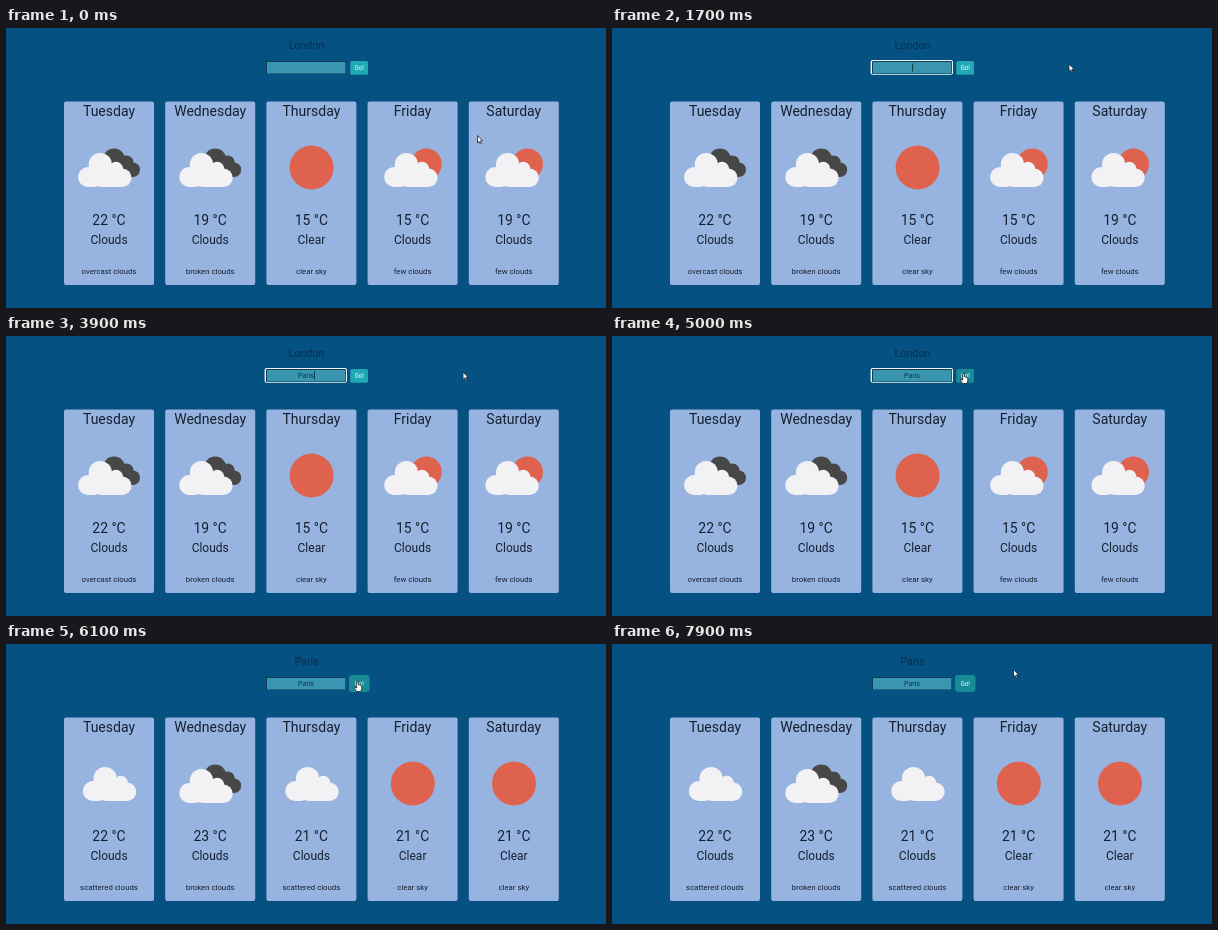
Recreate the animation shown at these times as an HTML page with a canvas. Size 600 px wide and 280 px high, loop 8 s.

```html
<!DOCTYPE html>
<html lang="en">
<head>
<meta charset="utf-8">
<title>Weather forecast</title>
<style>
  html, body { margin: 0; width: 600px; height: 280px; overflow: hidden; background: #045182; }
  canvas { display: block; }
</style>
</head>
<body>
<canvas id="stage" width="600" height="280"></canvas>
<script>
const ctx = document.getElementById('stage').getContext('2d');
const LOOP = 8000;
const FONT = 'Roboto, "Open Sans", sans-serif';
const INK = '#14202f', SUN = '#df624e', WHITE = '#f2f1f4', DARK = '#474748';

const days = ['Tuesday', 'Wednesday', 'Thursday', 'Friday', 'Saturday'];
const forecasts = {
  London: [
    [22, 'Clouds', 'overcast clouds', 'broken'],
    [19, 'Clouds', 'broken clouds', 'broken'],
    [15, 'Clear', 'clear sky', 'sun'],
    [15, 'Clouds', 'few clouds', 'few'],
    [19, 'Clouds', 'few clouds', 'few']
  ],
  Paris: [
    [22, 'Clouds', 'scattered clouds', 'cloud'],
    [23, 'Clouds', 'broken clouds', 'broken'],
    [21, 'Clouds', 'scattered clouds', 'cloud'],
    [21, 'Clear', 'clear sky', 'sun'],
    [21, 'Clear', 'clear sky', 'sun']
  ]
};

// Event times in ms
const FOCUS = 1000, BLUR = 5300, TITLE = 5500, CARDS = 6100;
const keyTimes = [1900, 2000, 2150, 2250, 2400];

// Pointer moves: start, end, from, to
const moves = [
  [100, 800, [471.5, 107.5], [322, 39]],
  [1100, 1600, [322, 39], [457, 36]],
  [4500, 4900, [457, 36], [351.5, 37.5]],
  [7200, 7700, [351.5, 37.5], [401.5, 25.5]]
];

function pointerAt(t) {
  let pos = moves[0][2];
  for (const [a, b, p, q] of moves) {
    if (t < a) break;
    const u = Math.min(1, (t - a) / (b - a));
    const e = u * u * (3 - 2 * u);
    pos = p.map((v, i) => v + (q[i] - v) * e);
  }
  return pos;
}

function text(s, x, y, size, color) {
  ctx.font = size + 'px ' + FONT;
  ctx.textAlign = 'center';
  ctx.fillStyle = color || INK;
  ctx.fillText(s, x, y);
}

function box(x, y, w, h, r, color) {
  ctx.fillStyle = color;
  ctx.beginPath();
  ctx.roundRect(x, y, w, h, r);
  ctx.fill();
}

function disc(x, y, r, color) {
  ctx.fillStyle = color;
  ctx.beginPath();
  ctx.arc(x, y, r, 0, Math.PI * 2);
  ctx.fill();
}

// Cloud with its left edge at x and its base at y
function cloud(x, y, color, k = 1) {
  ctx.save();
  ctx.translate(x, y);
  ctx.scale(k, k);
  box(0, -20, 26, 20, 10, color);
  box(14, -18.5, 39.5, 18.5, 9.2, color);
  disc(22.3, -22.5, 11.6, color);
  disc(38, -18, 7.2, color);
  ctx.restore();
}

const icons = {
  sun(x) { disc(x + 2.5, 139.5, 22, SUN); },
  cloud(x) { cloud(x - 26.2, 157, WHITE); },
  broken(x) {
    disc(x + 5, 131.5, 11, DARK);
    disc(x + 17.5, 134.5, 7, DARK);
    box(x - 4, 134.5, 35, 14.5, 7.2, DARK);
    cloud(x - 31, 159, WHITE);
  },
  few(x) {
    disc(x + 13.7, 136, 15.5, SUN);
    cloud(x - 28.5, 159, WHITE);
  }
};
icons.sun = x => disc(x + 0.2, 139.5, 22, SUN);

function card(i, [temp, sky, detail, icon]) {
  const x = 58 + i * 101.2, mid = x + 45;
  box(x, 73.5, 90, 183.5, 2, '#97b4e0');
  text(days[i], mid, 87.5, 14);
  icons[icon](mid);
  text(temp + ' °C', mid, 197, 13.9);
  text(sky, mid, 215.6, 12);
  text(detail, mid, 245.6, 7.8);
}

function field(t) {
  const focused = t >= FOCUS && t < BLUR;
  if (focused) box(258.6, 32, 82.4, 14.8, 2, '#eef4f8');
  box(260, 33, 80, 13, focused ? 1 : 0, '#123b56');
  box(261, 34, 78.4, 11.4, 0, '#3995b0');
  const value = 'Paris'.slice(0, keyTimes.filter(k => t >= k).length);
  text(value, 300, 42.2, 7, '#10344a');
  if (focused && Math.floor((t - FOCUS) / 500) % 2 === 1 && t > 1700 && t < 4500) {
    const half = ctx.measureText(value).width / 2;
    box(300.3 + half, 35.5, 0.8, 8, 0, '#0c2230');
  }
}

function button(hover, pressed) {
  const color = hover || pressed ? '#198b97' : '#20a8b5';
  if (pressed) box(343, 31, 20.5, 17, 3, color);
  else box(344.3, 33, 17.7, 13.8, 1.5, color);
  text('Go!', 353.2, 42, 6.3, '#eefafa');
}

function shape(points, x, y) {
  ctx.beginPath();
  points.forEach(([a, b]) => ctx.lineTo(x + a, y + b));
  ctx.closePath();
  ctx.fillStyle = '#fff';
  ctx.strokeStyle = '#1b2026';
  ctx.lineWidth = 0.8;
  ctx.lineJoin = 'round';
  ctx.fill();
  ctx.stroke();
}

const arrow = [[0, 0], [0, 7.4], [1.6, 5.9], [2.7, 8.4], [3.9, 7.9], [2.8, 5.4], [5, 5.3]];
const hand = [[-0.8, 0], [0.8, 0], [0.9, 3.2], [4.2, 4], [4.4, 7], [3.3, 10], [-0.8, 10], [-3.3, 6.5], [-2.6, 5.6], [-0.9, 6.6]];

function pointer(x, y, hover) {
  if (hover) {
    shape(hand, x, y);
  } else if (x > 260 && x < 340 && y > 33 && y < 46) {
    box(x - 0.4, y - 4, 0.9, 8, 0, '#111');
    box(x - 1.8, y - 4.4, 3.7, 0.8, 0, '#111');
    box(x - 1.8, y + 3.6, 3.7, 0.8, 0, '#111');
  } else {
    shape(arrow, x, y);
  }
}

function draw(t) {
  const [px, py] = pointerAt(t);
  const hover = px > 344 && px < 363 && py > 32 && py < 47 && t > 4500;
  ctx.fillStyle = '#045182';
  ctx.fillRect(0, 0, 600, 280);
  text(t < TITLE ? 'London' : 'Paris', 300.5, 21, 10.7, '#0e2d47');
  field(t);
  button(hover, t >= BLUR);
  forecasts[t < CARDS ? 'London' : 'Paris'].forEach((f, i) => card(i, f));
  pointer(px, py, hover);
}

const start = performance.now();
function tick() {
  draw((performance.now() - start) % LOOP);
  requestAnimationFrame(tick);
}
tick();
</script>
</body>
</html>
```
